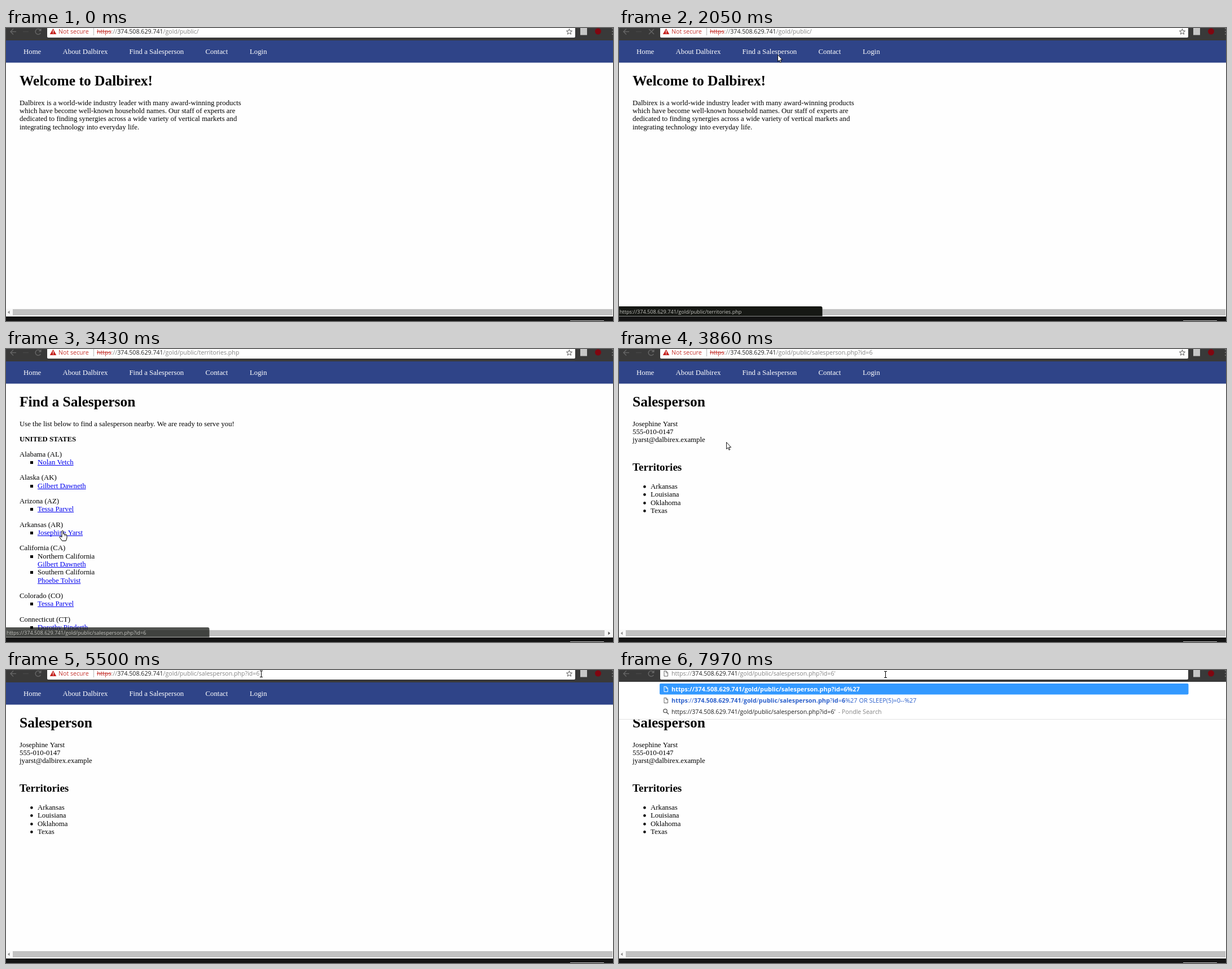
These frames come from a looping animation (1076 by 520 pixels, 8000 ms). An HTML page with a canvas:

```html
<!DOCTYPE html>
<html lang="en">
<head>
<meta charset="utf-8">
<title>Browser session</title>
<style>
html, body { margin: 0; width: 100%; height: 100%; overflow: hidden; background: #fff; }
canvas { display: block; }
</style>
</head>
<body>
<canvas id="stage" width="1076" height="520"></canvas>
<script>
const ctx = document.getElementById('stage').getContext('2d');
const LOOP = 8000;
const SERIF = '"Liberation Serif", serif';
const SANS = '"Open Sans", "Noto Sans", sans-serif';
const BODY = `12.8px ${SERIF}`;
const BAR = `10.64px ${SANS}`;
const ROW = `10.9px ${SANS}`;
const ROW_BOLD = `bold 10.9px ${SANS}`;
const HOST = '374.508.629.741';
const DIR = '/gold/public/';
const PERSON = 'Josephine Yarst';
const LIST = 'territories.php', DETAIL = 'salesperson.php?id=6';
const BASE = `https://${HOST}${DIR}`;

const STATES = [
  ['Alabama (AL)', '*Nolan Vetch'],
  ['Alaska (AK)', '*Gilbert Dawneth'],
  ['Arizona (AZ)', '*Tessa Parvel'],
  ['Arkansas (AR)', '*' + PERSON],
  ['California (CA)', '-Northern California', '+Gilbert Dawneth', '-Southern California', '+Phoebe Tolvist'],
  ['Colorado (CO)', '*Tessa Parvel'],
  ['Connecticut (CT)', '*Dorothy Pinderth']
];

// Pointer moves: start, end, steps, from x, y, to x, y, shape
const MOVES = [
  [500, 1230, 6, 439, 137, 291, 53, 'arrow'],
  [1510, 1920, 4, 288, 50, 281, 46, 'hand'],
  [2050, 2050, 1, 281, 47, 281, 47, 'arrow'],
  [2350, 3280, 8, 270, 66, 101, 313, 'arrow'],
  [3430, 3580, 2, 99, 322, 99, 322, 'hand'],
  [3720, 3860, 2, 130, 275, 190, 165, 'arrow'],
  [4140, 4140, 1, 262, 44, 262, 44, 'hand'],
  [4280, 4280, 1, 267, 52, 267, 52, 'arrow'],
  [4400, 4400, 1, 275, 21, 275, 21, 'arrow'],
  [4680, 5500, 7, 300, 8, 452, 7, 'beam'],
  [5750, 5900, 2, 462, 7, 472, 8, 'beam']
];

function box(x, y, w, h, color) {
  ctx.fillStyle = color;
  ctx.fillRect(x, y, w, h);
}

function dot(x, y, r, color) {
  ctx.fillStyle = color;
  ctx.beginPath();
  ctx.arc(x, y, r, 0, 7);
  ctx.fill();
}

// Draws text on a whole-pixel baseline and returns its right edge
function text(str, x, y, font = BODY, color = '#000') {
  ctx.font = font;
  ctx.fillStyle = color;
  ctx.fillText(str, x, Math.round(y));
  return x + ctx.measureText(str).width;
}

function line(points, color, width = 1) {
  ctx.strokeStyle = color;
  ctx.lineWidth = width;
  ctx.beginPath();
  points.forEach(([x, y]) => ctx.lineTo(x, y));
  ctx.stroke();
}

function shape(points, fill, edge, width = 1) {
  ctx.beginPath();
  points.forEach(([x, y]) => ctx.lineTo(x, y));
  ctx.closePath();
  if (fill) { ctx.fillStyle = fill; ctx.fill(); }
  if (edge) { ctx.strokeStyle = edge; ctx.lineWidth = width; ctx.stroke(); }
}

function rounded(x, y, w, h, radii, color) {
  ctx.fillStyle = color;
  ctx.beginPath();
  ctx.roundRect(x, y, w, h, radii);
  ctx.fill();
}

function heading(str) {
  text(str, 24, 102, `bold 25.5px ${SERIF}`);
}

function paragraph(lines, y) {
  lines.forEach((str, i) => text(str, 24, y + i * 14.4));
}

function link(str, x, y) {
  const end = text(str, x, y, BODY, '#0000ee');
  box(x, Math.round(y) + 1, end - x, 1, '#0000ee');
}

function homePage() {
  heading('Welcome to Dalbirex!');
  paragraph([
    'Dalbirex is a world-wide industry leader with many award-winning products',
    'which have become well-known household names. Our staff of experts are',
    'dedicated to finding synergies across a wide variety of vertical markets and',
    'integrating technology into everyday life.'
  ], 136.6);
}

function listPage() {
  heading('Find a Salesperson');
  text('Use the list below to find a salesperson nearby. We are ready to serve you!', 24, 136.6);
  text('UNITED STATES', 24, 163.8, `bold 12.8px ${SERIF}`);
  let y = 190.8;
  for (const [state, ...items] of STATES) {
    text(state, 24, y);
    for (const item of items) {
      y += 14.4;
      const mark = item[0], label = item.slice(1);
      if (mark !== '+') box(43, Math.round(y) - 6, 5, 5, '#000');
      (mark === '-' ? text : link)(label, 56, y);
    }
    y += 27.2;
  }
}

function detailPage() {
  heading('Salesperson');
  paragraph([PERSON, '555-010-0147', 'jyarst@dalbirex.example'], 136.6);
  text('Territories', 24, 216, `bold 19.1px ${SERIF}`);
  ['Arkansas', 'Louisiana', 'Oklahoma', 'Texas'].forEach((name, i) => {
    const y = 247.7 + i * 14.4;
    dot(45.4, Math.round(y) - 3.6, 2.3, '#000');
    text(name, 56, y);
  });
}

function nav() {
  box(0, 22, 1076, 39.5, '#2f4488');
  [['Home', 31], ['About Dalbirex', 100.5], ['Find a Salesperson', 218.5], ['Contact', 353.5], ['Login', 432]]
    .forEach(([label, x]) => text(label, x, 46, BODY, '#fff'));
}

function scrollbar(onList) {
  box(0, 498, 1076, 14, '#f8f8f8');
  box(12, 499, onList ? 1049 : 1063, 11, '#c1c1c1');
  shape([[3, 504.5], [6.5, 501.5], [6.5, 507.5]], '#8b8b8b');
  if (onList) shape([[1071, 504.5], [1067.5, 501.5], [1067.5, 507.5]], '#505050');
  box(0, 512, 1076, 8, '#141414');
  box(1000, 519, 60, 1, '#c8c8c8');
}

function bubble(file, alpha) {
  ctx.globalAlpha = alpha;
  rounded(0, 494, 360.5, 17.5, [0, 3, 0, 0], '#161814');
  ctx.globalAlpha = 1;
  text(BASE + file, 1, 507, `9.12px ${SANS}`, '#c4c4c0');
}

function pageIcon(y, color) {
  line([[80, y - 4.5], [84, y - 4.5], [86.5, y - 2], [86.5, y + 4.5], [80, y + 4.5], [80, y - 5]], color);
  line([[83.5, y - 4], [83.5, y - 1.5], [86.5, y - 1.5]], color);
}

function toolbar(loading) {
  box(0, 0, 1076, 22, '#393939');
  line([[18, 6.5], [8, 6.5]], '#686868', 1.3);
  line([[13, 1.5], [8, 6.5], [13, 11.5]], '#686868', 1.3);
  line([[30, 6.5], [40, 6.5]], '#484848', 1.3);
  if (loading) {
    line([[53, 2], [62, 11]], '#686868', 1.3);
    line([[62, 2], [53, 11]], '#686868', 1.3);
  } else {
    ctx.strokeStyle = '#686868';
    ctx.lineWidth = 1.4;
    ctx.beginPath();
    ctx.arc(57, 6.5, 4.8, 0.5, 5.6);
    ctx.stroke();
    shape([[62.5, 0.5], [62.5, 5.5], [57.5, 5.5]], '#686868');
  }
  rounded(73, -4, 936, 21, [0, 0, 2, 2], '#fff');
  box(1018, 0, 12, 12.5, '#c6c6c6');
  dot(1049.5, 6, 5.5, '#800610');
  [1, 6, 11].forEach(y => dot(1075, y, 1, '#777'));
}

function address(file, selected, caret) {
  shape([[83.5, 1], [89.3, 11], [77.7, 11]], '#c5221f');
  box(83, 4, 1.2, 3.6, '#fff');
  box(83, 8.5, 1.2, 1.2, '#fff');
  text('Not secure', 93, 10, BAR, '#c5342f');
  box(155, 0, 1, 13, '#b8b8b8');
  const star = Array.from({ length: 10 }, (_, i) => {
    const r = i % 2 ? 2.3 : 5.3, a = i * Math.PI / 5 - Math.PI / 2;
    return [998.5 + r * Math.cos(a), 6.8 + r * Math.sin(a)];
  });
  shape(star, null, '#555');

  ctx.font = BAR;
  if (selected) box(161, 0, ctx.measureText(BASE + file).width, 13, '#3399ff');
  const tint = color => selected ? '#fff' : color;
  let x = text('https', 161, 10, BAR, tint('#c5342f'));
  box(161, 6, x - 161, 1, tint('#c5342f'));
  x = text('://', x, 10, BAR, tint('#858585'));
  x = text(HOST, x, 10, BAR, tint('#222'));
  text(DIR + file, x, 10, BAR, tint('#858585'));
  if (caret) box(450, 0, 1, 13, '#222');
}

function typedAddress(caret) {
  pageIcon(6.5, '#666');
  let x = text('https://', 93, 10, BAR, '#858585');
  x = text(HOST, x, 10, BAR, '#222');
  text(DIR + DETAIL + "'", x, 10, BAR, '#858585');
  if (caret) box(384, 0, 1, 13, '#222');
}

function suggestions() {
  box(0, 21, 1076, 66, '#fff');
  box(0, 87, 1076, 1, '#e4e4e4');
  rounded(72, 24, 937.5, 19.5, 2, '#3399ff');
  pageIcon(34, '#fff');
  text(BASE + DETAIL + '%27', 93, 38, ROW_BOLD, '#fff');

  pageIcon(54, '#666');
  const blue = '#2a5fcb';
  let x = 93;
  for (const part of (BASE + DETAIL).split(/([:\/?=]+)/)) {
    x = text(part, x, 58, /^[:\/?=]/.test(part) ? ROW : ROW_BOLD, blue);
  }
  text('%27 OR SLEEP(5)=0--%27', x, 58, ROW, blue);

  ctx.strokeStyle = '#555';
  ctx.lineWidth = 1.3;
  ctx.beginPath();
  ctx.arc(82, 72.5, 3.2, 0, 7);
  ctx.stroke();
  line([[84.4, 75], [88, 78.5]], '#555', 1.5);
  x = text(BASE + DETAIL + "'", 93, 78, BAR, '#222');
  text(' - Pondle Search', x + 2, 78, BAR, '#858585');
}

const pointers = {
  arrow() {
    shape([[0.5, 0.5], [0.5, 12.5], [3.2, 10], [5, 14.3], [6.8, 13.5], [5, 9.4], [8.6, 9.4]], '#fff', '#000', 0.9);
  },
  hand() {
    ctx.beginPath();
    ctx.moveTo(0, 12);
    ctx.lineTo(0, 1.2);
    ctx.quadraticCurveTo(1.3, -1, 2.6, 1.2);
    ctx.lineTo(2.6, 6);
    ctx.lineTo(6.5, 7);
    ctx.quadraticCurveTo(9, 7.4, 9, 9.5);
    ctx.lineTo(9, 13);
    ctx.lineTo(7.2, 18.5);
    ctx.lineTo(0.5, 18.5);
    ctx.lineTo(-4, 12);
    ctx.quadraticCurveTo(-3.5, 9, 0, 12);
    ctx.closePath();
    ctx.fillStyle = '#fff';
    ctx.fill();
    ctx.strokeStyle = '#000';
    ctx.lineWidth = 1;
    ctx.stroke();
    line([[4.8, 7], [4.8, 10]], '#000', 0.7);
    line([[6.9, 7.5], [6.9, 10]], '#000', 0.7);
  },
  beam() {
    line([[0.5, -6], [0.5, 6]], '#000');
    line([[-2, -5.5], [3, -5.5]], '#000');
    line([[-2, 5.5], [3, 5.5]], '#000');
  }
};

function pointer(t) {
  const move = MOVES.filter(m => t >= m[0]).pop();
  if (!move) return;
  const [start, end, steps, x0, y0, x1, y1, kind] = move;
  const raw = end > start ? Math.min(1, (t - start) / (end - start)) : 1;
  const k = steps > 1 ? Math.floor(raw * (steps - 1) + 1e-6) / (steps - 1) : 1;
  const ease = k * (2 - k);
  ctx.save();
  ctx.translate(Math.round(x0 + (x1 - x0) * ease), Math.round(y0 + (y1 - y0) * ease));
  pointers[kind]();
  ctx.restore();
}

function draw(t) {
  const within = (a, b) => t >= a && t < b;
  const onList = within(2350, 3720);
  const typed = t >= 7440;
  const file = t < 2350 ? '' : onList ? LIST : DETAIL;

  box(0, 0, 1076, 520, '#fefefe');
  (t < 2350 ? homePage : onList ? listPage : detailPage)();
  nav();
  scrollbar(onList);

  if (within(1510, 2350)) bubble(LIST, t < 1647 ? 0.75 : 1);
  if (within(3430, 3720)) bubble(DETAIL, t < 3580 ? 0.75 : 1);
  if (within(4140, 4280)) bubble(LIST, 1);

  toolbar(within(1920, 2350) || within(3580, 3720));
  if (typed) {
    typedAddress(t < 7970);
    suggestions();
  } else {
    address(file, within(5630, 6170), within(6170, 6730) || t >= 7290);
  }
  pointer(t);
}

const begin = performance.now();
function tick() {
  draw((performance.now() - begin) % LOOP);
  requestAnimationFrame(tick);
}
tick();
</script>
</body>
</html>
```
